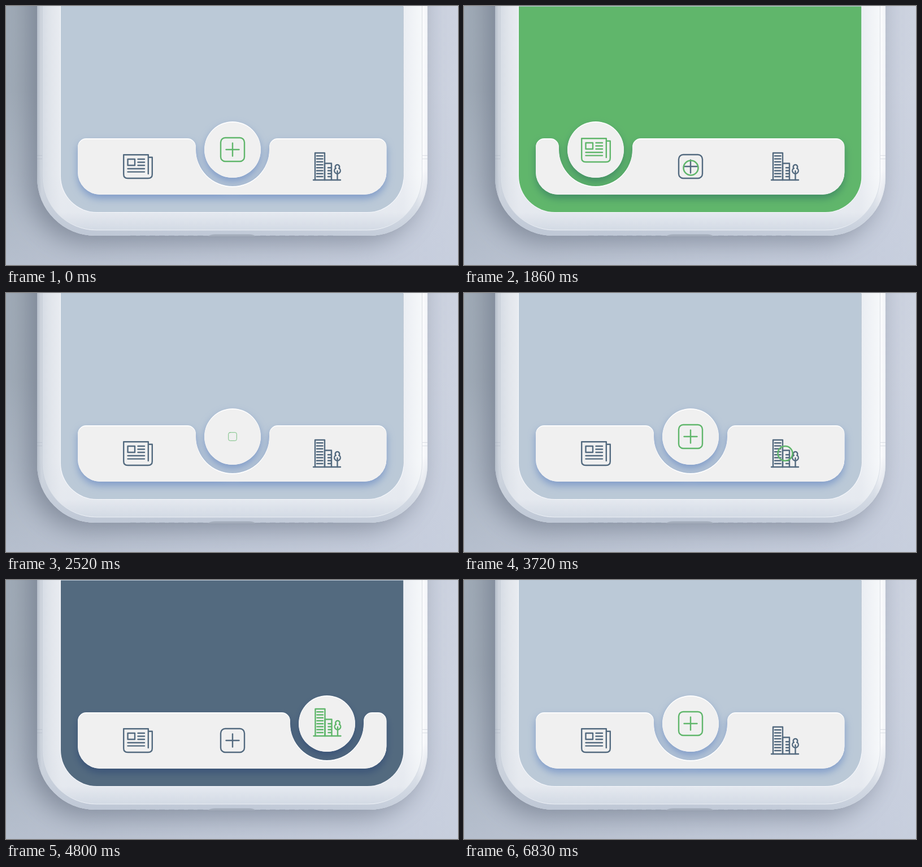
An HTML page with a canvas that plays this animation: 800x460 px, repeating every 7.72 s.

```html
<!DOCTYPE html>
<html lang="en">
<head>
<meta charset="utf-8">
<title>Tab bar</title>
<style>
html, body { margin: 0; width: 100%; height: 100%; overflow: hidden; background: #b9c1cf; }
canvas { display: block; }
</style>
</head>
<body>
<canvas id="stage" width="800" height="460"></canvas>
<script>
const ctx = document.getElementById('stage').getContext('2d');
const LOOP = 7720, STEP = 30;
const GREEN = '#60b66b', SLATE = '#536a7f', LIGHT = '#bbc9d7', PAPER = '#f0f0f0';
const PAGES = [GREEN, LIGHT, SLATE];
const SCREEN = { x: 97, w: 606.5, bottom: 366, r: 64 };
const TABS = [
  { x: 233, lift: 29, dx: 0, draw: news, tapY: 285 },
  { x: 401, lift: 30, dx: 0, draw: plus, tapY: 287.5 },
  { x: 568, lift: 32, dx: 0.5, draw: city, tapY: 285 }
];
const MOVES = [
  { at: 70, from: 1, to: 0 },
  { at: 1860, from: 0, to: 1 },
  { at: 3720, from: 1, to: 2 },
  { at: 5600, from: 2, to: 1 }
];
const DONE = 1e5, ICON_AT = 625;

const clamp = p => Math.min(1, Math.max(0, p));
const lerp = (a, b, p) => a + (b - a) * p;
const out = p => 1 - Math.pow(1 - clamp(p), 3);
const inOut = p => (p = clamp(p)) < 0.5 ? 4 * p ** 3 : 1 - 4 * (1 - p) ** 3;
function back(p, s) {
  const q = clamp(p) - 1;
  return q * q * ((s + 1) * q + s) + 1;
}

function box(g, x, y, w, h, r) {
  g.beginPath();
  g.roundRect(x, y, w, h, r);
}
function line(g, x1, y1, x2, y2) {
  g.beginPath();
  g.moveTo(x1, y1);
  g.lineTo(x2, y2);
  g.stroke();
}
function scaled(g, x, y, k, draw) {
  if (k <= 0.01) return;
  g.save();
  g.translate(x, y);
  g.scale(k, k);
  g.translate(-x, -y);
  draw();
  g.restore();
}
function growLine(g, x1, y1, x2, y2, k) {
  if (k > 0) line(g, x1, y1, lerp(x1, x2, k), lerp(y1, y2, k));
}
function gradient(g, x1, y1, x2, y2, stops) {
  const fill = g.createLinearGradient(x1, y1, x2, y2);
  stops.forEach(([p, c]) => fill.addColorStop(p, c));
  return fill;
}

// Icons: t is the time since the icon began to build.
function news(g, t) {
  scaled(g, 0, 0, back(t / 480, 1.7), () => {
    g.beginPath();
    g.moveTo(18.8, 13);
    g.lineTo(18.8, -20.7);
    g.lineTo(-24.8, -20.7);
    g.lineTo(-24.8, 14);
    g.quadraticCurveTo(-24.8, 21, -17.5, 21);
    g.lineTo(18.5, 21);
    g.quadraticCurveTo(25.8, 21, 25.8, 14);
    g.lineTo(25.8, -16.3);
    g.lineTo(19.5, -16.3);
    g.stroke();
  });
  scaled(g, -11.5, -7.5, back((t - 120) / 400, 1.7), () => g.strokeRect(-17.5, -13, 12.5, 11));
  [[0.5, -13], [0.5, -7.5], [0.5, -2], [-17.5, 4], [-17.5, 9.6]].forEach(([x, y], i) =>
    growLine(g, x, y, 12, y, out((t - 180 - 60 * i) / 300)));
}

function plus(g, t) {
  scaled(g, 0, 0, back(t / 500, 2.5), () => {
    box(g, -21, -21, 42, 42, 8);
    g.stroke();
  });
  const h = 11.5 * out((t - 150) / 410), v = 11.5 * out((t - 200) / 400);
  if (h > 0) line(g, -h, 0, h, 0);
  if (v > 0) line(g, 0, -v, 0, v);
}

function city(g, t) {
  const base = 24;
  growLine(g, -24, base, 24, base, out(t / 150));
  [[-21, 17, 48, 30], [-4, 12, 29.5, 100]].forEach(([x, w, h, wait]) => {
    const k = out((t - wait) / 250);
    if (!k) return;
    g.beginPath();
    g.moveTo(x, base);
    g.lineTo(x, base - h * k);
    g.lineTo(x + w, base - h * k);
    g.lineTo(x + w, base);
    g.stroke();
  });
  for (let i = 0; i < 8; i++) {
    const k = out((t - 180 - 18 * i) / 120), y = 18 - 5.25 * i;
    growLine(g, -18, y, -7.5, y, k);
    if (i < 4) growLine(g, 7, y, 2, y, k);
  }
  scaled(g, 18.5, base, out((t - 150) / 300), () => {
    line(g, 18.5, 8, 18.5, base);
    g.beginPath();
    g.arc(18.5, 0.8, 3.8, 0.75 * Math.PI, 2.25 * Math.PI);
    g.arc(18.5, 7.5, 5.3, -0.25 * Math.PI, 1.25 * Math.PI);
    g.closePath();
    g.stroke();
  });
}

function icon(g, tab, x, y, color, t, k, alpha) {
  if (k <= 0.01 || alpha <= 0) return;
  g.save();
  g.translate(x, y);
  g.scale(k, k);
  g.globalAlpha = alpha;
  g.strokeStyle = color;
  g.lineWidth = 2.4;
  g.lineCap = g.lineJoin = 'round';
  tab.draw(g, t);
  g.restore();
}

function drawPhone(g) {
  g.fillStyle = gradient(g, 0, 0, 800, 0,
    [[0, '#a0abb7'], [0.1, '#a5aebb'], [0.5, '#b9c1cf'], [0.93, '#cad0de'], [1, '#cdd3e0']]);
  g.fillRect(0, 0, 800, 460);
  g.fillStyle = gradient(g, 0, 150, 0, 460,
    [[0, 'rgba(196,204,220,0)'], [1, 'rgba(196,204,220,.6)']]);
  g.fillRect(0, 0, 800, 460);

  g.save();
  g.shadowColor = 'rgba(80,90,108,.5)';
  g.shadowBlur = 46;
  g.shadowOffsetX = -14;
  g.shadowOffsetY = 12;
  box(g, 55, -200, 691, 608, 103);
  g.fillStyle = '#ccd3dd';
  g.fill();
  g.restore();

  g.save();
  box(g, 55, -200, 691, 608, 103);
  g.clip();
  g.fillStyle = gradient(g, 55, 0, 746, 0,
    [[0, '#b4bdc9'], [0.012, '#d3d9e1'], [0.5, '#d7dce5'], [0.97, '#eef1f5'], [0.985, '#fdfdfe'], [1, '#f1f3f7']]);
  g.fillRect(55, 0, 691, 408);
  g.fillStyle = gradient(g, 0, 290, 0, 408,
    [[0, 'rgba(184,194,210,0)'], [1, 'rgba(184,194,210,.75)']]);
  g.fillRect(55, 290, 691, 118);
  box(g, 64, -200, 672.5, 598, 96);
  g.fillStyle = gradient(g, 64, 0, 736, 0,
    [[0, '#d6dce4'], [0.025, '#e2e6ec'], [0.05, '#e9ecf1'], [0.5, '#e9edf3'], [0.95, '#eaedf2'], [1, '#f6f8fa']]);
  g.fill();
  g.fillStyle = gradient(g, 0, 300, 0, 398,
    [[0, 'rgba(205,213,225,0)'], [0.68, 'rgba(205,213,225,.15)'], [1, 'rgba(205,213,225,.8)']]);
  g.fill();
  g.lineWidth = 1;
  g.strokeStyle = gradient(g, 0, 260, 0, 398,
    [[0, 'rgba(165,175,190,.4)'], [0.6, 'rgba(190,199,212,.4)'], [1, 'rgba(245,248,252,.8)']]);
  g.stroke();
  g.strokeStyle = 'rgba(150,160,176,.3)';
  [265.5, 271.5].forEach(y => {
    line(g, 55, y, 64, y);
    line(g, 737, y, 746, y);
  });
  g.restore();

  g.fillStyle = '#a4adbb';
  g.beginPath();
  g.moveTo(357, 409);
  g.quadraticCurveTo(362, 405.5, 370, 405.5);
  g.lineTo(430, 405.5);
  g.quadraticCurveTo(438, 405.5, 442, 409);
  g.fill();
  g.strokeStyle = 'rgba(130,140,156,.35)';
  g.setLineDash([10, 7]);
  line(g, 220, 408, 350, 408);
  line(g, 450, 408, 580, 408);
  g.setLineDash([]);

  box(g, SCREEN.x, -200, SCREEN.w, 200 + SCREEN.bottom, SCREEN.r);
  g.strokeStyle = 'rgba(250,252,255,.8)';
  g.lineWidth = 2;
  g.stroke();
}

function barShape(cx) {
  const p = new Path2D(), l = 127, r = 673.5, top = 235, low = 335;
  p.moveTo(l, top + 15);
  p.arcTo(l, top, l + 15, top, 15);
  p.arcTo(cx - 65, top, cx - 65, 255, 15);
  p.lineTo(cx - 65, 255);
  p.arc(cx, 255, 65, Math.PI, 0, true);
  p.lineTo(cx + 65, 250);
  p.arcTo(cx + 65, top, cx + 80, top, 15);
  p.arcTo(r, top, r, top + 15, 15);
  p.arcTo(r, low, r - 40, low, 40);
  p.arcTo(l, low, l, low - 40, 40);
  p.closePath();
  return p;
}

function castShadow(shape) {
  ctx.save();
  ctx.globalCompositeOperation = 'multiply';
  ctx.shadowColor = 'rgba(122,160,228,.6)';
  ctx.shadowBlur = 14;
  ctx.shadowOffsetX = 2000;
  ctx.shadowOffsetY = 7;
  ctx.translate(-2000, 0);
  ctx.fill(shape);
  ctx.restore();
}

// White surface covered by a slightly lowered grey one leaves a bright top edge.
function raised(shape) {
  ctx.save();
  ctx.fillStyle = '#fff';
  ctx.fill(shape);
  ctx.clip(shape);
  ctx.translate(0, 1.8);
  ctx.fillStyle = PAPER;
  ctx.fill(shape);
  ctx.restore();
}

const phone = document.createElement('canvas');
phone.width = 800;
phone.height = 460;
drawPhone(phone.getContext('2d'));

function render(time) {
  const now = time < MOVES[0].at ? time + LOOP : time;
  const move = MOVES.filter(m => m.at <= now).pop();
  const t = Math.floor((now - move.at) / STEP) * STEP;
  const { from, to } = move;
  const slide = inOut((t - 120) / 500);
  const cx = lerp(TABS[from].x, TABS[to].x, slide);
  const page = lerp(from, to, slide);

  ctx.drawImage(phone, 0, 0);
  ctx.save();
  box(ctx, SCREEN.x, -200, SCREEN.w, 200 + SCREEN.bottom, SCREEN.r);
  ctx.clip();
  ctx.fillStyle = LIGHT;
  ctx.fillRect(SCREEN.x, 0, SCREEN.w, 1);
  PAGES.forEach((color, i) => {
    ctx.fillStyle = color;
    ctx.fillRect(SCREEN.x + (i - page) * SCREEN.w, 1, SCREEN.w, SCREEN.bottom);
  });
  const bar = barShape(cx), knob = new Path2D();
  knob.arc(cx, 255, 50, 0, 2 * Math.PI);
  castShadow(bar);
  castShadow(knob);
  raised(bar);
  raised(knob);
  ctx.restore();

  TABS.forEach((tab, i) => {
    let alpha = 1;
    if (i === to) alpha = 1 - clamp((t - 30) / 210);
    if (i === from) alpha = clamp((t - 400) / 240);
    icon(ctx, tab, tab.x, 285, SLATE, DONE, 1, alpha);
  });

  const old = TABS[from], next = TABS[to];
  icon(ctx, old, cx + old.dx, 285 - old.lift, GREEN, DONE, 1 - inOut(t / 240), 1);
  if (t > ICON_AT) icon(ctx, next, cx + next.dx, 285 - next.lift, GREEN, t - ICON_AT, 1, 1);

  const ripple = t / 210;
  if (ripple < 1) {
    ctx.strokeStyle = GREEN;
    ctx.lineWidth = 2.6 * (1 - ripple);
    ctx.beginPath();
    ctx.arc(next.x + 0.5, next.tapY, lerp(13, 21, out(ripple)), 0, 2 * Math.PI);
    ctx.stroke();
  }
}

const start = performance.now();
function tick() {
  render((performance.now() - start) % LOOP);
  requestAnimationFrame(tick);
}
tick();
</script>
</body>
</html>
```
